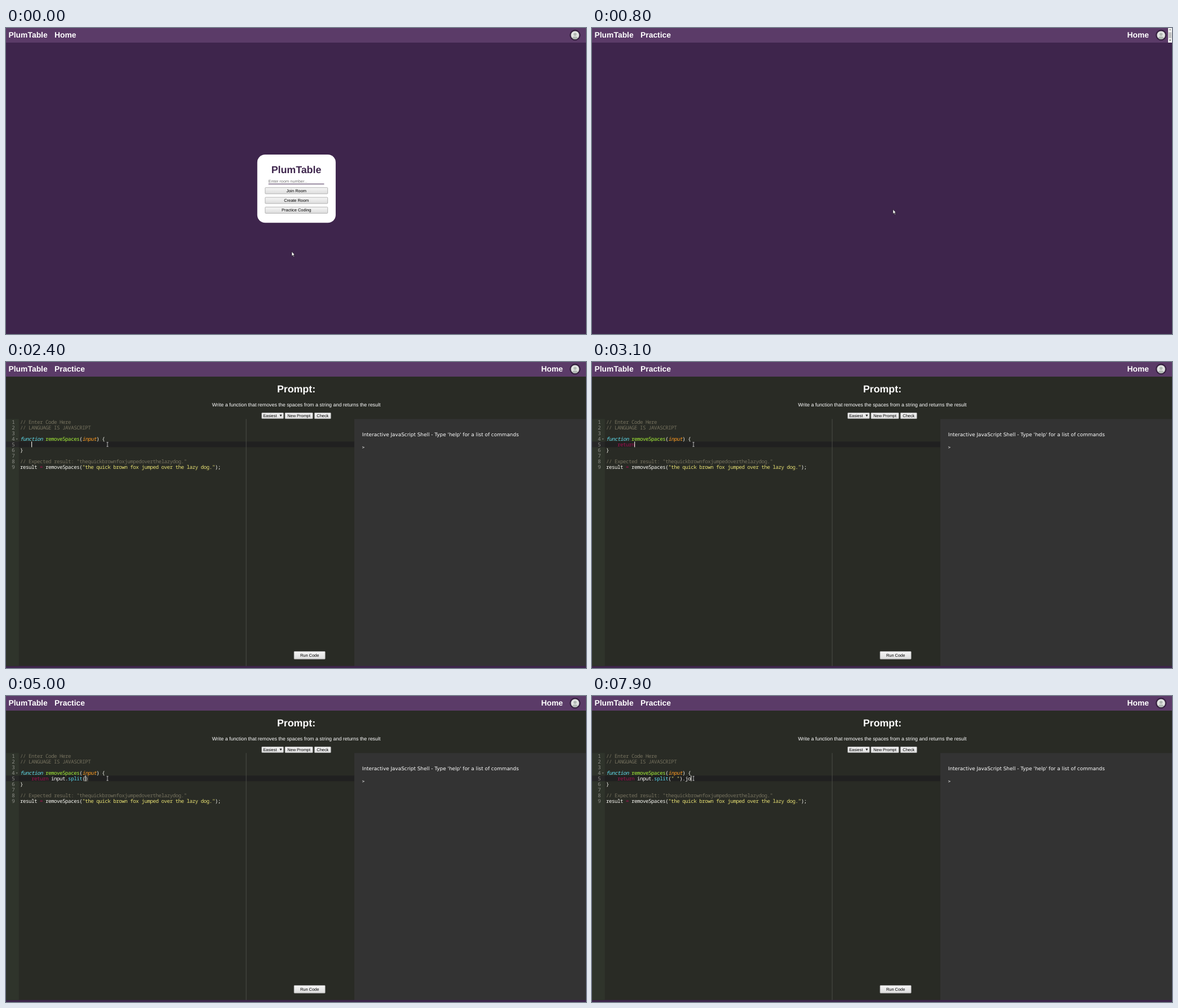
Animation, 1029 px wide and 544 px high, one loop 8 s. Source, as an HTML page with a canvas:

```html
<!DOCTYPE html>
<html lang="en">
<head>
<meta charset="utf-8">
<title>Coding practice</title>
<style>
  html, body { margin: 0; width: 100%; height: 100%; overflow: hidden; background: #3e254c; }
  canvas { display: block; }
</style>
</head>
<body>
<canvas id="stage" width="1029" height="544"></canvas>
<script>
const ctx = document.getElementById('stage').getContext('2d');
const LOOP = 8000;
const SANS = '"Liberation Sans", Arial, sans-serif';
const SHELL = '"DejaVu Sans", sans-serif';
const MONO = '"Noto Sans Mono", monospace';
const BRAND = 'PlumTable';

const COLOR = {
  page: '#3e254c', nav: '#5b3b68', editor: '#292b25', gutter: '#2f342b',
  plain: '#f8f8f2', comment: '#75715e', keyword: '#a5104f', type: '#5fdcec',
  name: '#a3ee36', param: '#fd971f', string: '#e6df72'
};

// Editor grid
const COL = 5.01, ROW = 10.01, LEFT = 25.2, TOP = 101.4;
const colX = c => LEFT + c * COL;
const rowY = r => TOP + (r - 1) * ROW;

// [time, x, y]
const arrowPath = [
  [0, 507, 397.5], [100, 512, 388], [200, 521, 367], [300, 530, 346],
  [400, 533.5, 334.8], [600, 534, 322.5]
];
const beamPath = [
  [1000, 535, 323.5], [1100, 510, 290], [1200, 460, 238], [1300, 424, 209],
  [1500, 385, 198], [1600, 310, 179], [1700, 245, 164], [1800, 200, 152], [1900, 180, 146.5]
];

// [time, text before caret, text after caret, columns of matched brackets]
const typing = [
  [2000, '', ''], [2400, '    ', ''],
  [2600, '    r', ''], [2700, '    re', ''], [2900, '    ret', ''], [3100, '    return', ''],
  [3300, '    return ', ''], [3400, '    return i', ''], [3500, '    return in', ''],
  [3600, '    return inp', ''], [3800, '    return inpu', ''], [3900, '    return input', ''],
  [4100, '    return input.', ''], [4200, '    return input.s', ''], [4400, '    return input.spl', ''],
  [4600, '    return input.spli', ''], [4700, '    return input.split', ''],
  [4900, '    return input.split(', ')'], [5000, '    return input.split(', ')', [23]],
  [5500, '    return input.split("', '")'], [5700, '    return input.split(" ', '")'],
  [5900, '    return input.split(" "', ')'], [6300, '    return input.split(" ")', ''],
  [6400, '    return input.split(" ")', '', [22, 26]], [6700, '    return input.split(" ").', ''],
  [7300, '    return input.split(" ")', '', [22, 26]], [7500, '    return input.split(" ").', ''],
  [7700, '    return input.split(" ").j', ''], [7900, '    return input.split(" ").jo', '']
];

const latest = (steps, t) => steps.filter(s => s[0] <= t).pop();

function rect(x, y, w, h, fill) {
  ctx.fillStyle = fill;
  ctx.fillRect(x, y, w, h);
}

function disc(x, y, r, fill) {
  ctx.fillStyle = fill;
  ctx.beginPath();
  ctx.arc(x, y, r, 0, Math.PI * 2);
  ctx.fill();
}

function poly(points, fill) {
  ctx.beginPath();
  points.forEach(([x, y]) => ctx.lineTo(x, y));
  ctx.closePath();
  ctx.fillStyle = fill;
  ctx.fill();
}

function text(str, x, y, font, fill, align = 'left') {
  ctx.font = font;
  ctx.fillStyle = fill;
  ctx.textAlign = align;
  ctx.fillText(str, x, y);
}

function button(x, y, w, h, label, pressed, labelX = x + w / 2) {
  const shade = ctx.createLinearGradient(0, y, 0, y + h);
  shade.addColorStop(0, pressed ? '#d2d2d2' : '#f6f6f6');
  shade.addColorStop(1, pressed ? '#e8e8e8' : '#dcdcdc');
  ctx.beginPath();
  ctx.roundRect(x + 0.3, y + 0.3, w - 0.6, h - 0.6, 1);
  ctx.fillStyle = shade;
  ctx.fill();
  ctx.strokeStyle = '#9a9a9a';
  ctx.lineWidth = 0.7;
  ctx.stroke();
  text(label, labelX, y + h / 2 + 2.6, '7.42px ' + SANS, '#000', 'center');
}

function drawNav(title, showHome) {
  const font = 'bold 13.9px ' + SANS;
  rect(0, 0, 1029, 26, COLOR.nav);
  text(BRAND, 4.5, 17.3, font, '#fff');
  text(title, 86, 17.3, font, '#fff');
  if (showHome) text('Home', 949.5, 17.3, font, '#fff');
  disc(1009.6, 12.7, 9.6, '#35203f');
  disc(1009.6, 12.7, 7.3, '#e2e4e2');
  disc(1009.6, 11.2, 2.7, '#b2bab4');
  ctx.beginPath();
  ctx.ellipse(1009.6, 17.6, 4.6, 2.6, 0, 0, Math.PI * 2);
  ctx.fill();
}

function drawCard(pressed) {
  ctx.fillStyle = '#fff';
  ctx.beginPath();
  ctx.roundRect(445.8, 225, 139.1, 121.3, 14);
  ctx.fill();
  text(BRAND, 515, 258, 'bold 17.8px ' + SANS, COLOR.page, 'center');
  text('Enter room number...', 465.6, 275.3, '7.42px ' + SANS, '#757575');
  rect(465.6, 276.8, 98.8, 1, COLOR.page);
  button(459.5, 283.4, 111.5, 11.7, 'Join Room');
  button(459.5, 300.7, 111.5, 11.7, 'Create Room');
  button(459.5, 318, 111.5, 11.7, 'Practice Coding', pressed);
}

function drawScrollbar() {
  rect(1022, 0, 7, 26, '#f1f1f1');
  rect(1022.8, 7.5, 5.4, 10.5, '#c1c1c1');
  poly([[1023.8, 4], [1027.4, 4], [1025.6, 1.8]], '#8a8a8a');
  poly([[1023.8, 20.8], [1027.4, 20.8], [1025.6, 23]], '#505050');
}

function drawPrompt() {
  rect(0, 26, 1029, 76, COLOR.editor);
  text('Prompt:', 515, 54.2, 'bold 17.8px ' + SANS, '#fff', 'center');
  text('Write a function that removes the spaces from a string and returns the result',
    515, 78.6, '8.9px ' + SANS, '#fff', 'center');
  button(453.4, 90, 39.2, 11, 'Easiest', false, 468.3);
  poly([[485.3, 93.6], [489.7, 93.6], [487.5, 97.2]], '#222');
  button(494.7, 90, 49.8, 11.2, 'New Prompt');
  button(547, 90, 29.6, 11.2, 'Check');
}

// Code is laid out on a fixed column grid
function code(row, col, str, kind = 'plain', italic = '') {
  ctx.font = `${italic} 9.2px ${MONO}`;
  ctx.letterSpacing = '0px';
  ctx.letterSpacing = COL - ctx.measureText('0').width + 'px';
  ctx.fillStyle = COLOR[kind];
  ctx.textAlign = 'left';
  ctx.fillText(str, colX(col) - 0.25, rowY(row) + 8.1);
  ctx.letterSpacing = '0px';
}

function codeLine(row, tokens) {
  let col = 0;
  for (const [str, kind, italic] of tokens) {
    code(row, col, str, kind, italic);
    col += str.length;
  }
}

function typedTokens(line) {
  return line.split(/(\breturn\b|split(?=\()|" ?")/).map(part => {
    if (part === 'return') return [part, 'keyword'];
    if (part === 'split' && line.includes('split(')) return [part, 'type'];
    return [part, part[0] === '"' ? 'string' : 'plain'];
  });
}

function drawEditor(t) {
  const [, before, after, brackets = []] = latest(typing, t) || [0, '', ''];
  const active = t < 2000 ? 3 : 5;
  const bottom = 540.5;

  rect(0, TOP, 618, bottom - TOP, COLOR.editor);
  rect(0, TOP, 22.8, bottom - TOP, COLOR.gutter);
  rect(0, rowY(active), 22.8, ROW, '#272727');
  rect(22.8, rowY(active), 595.2, ROW, '#202020');
  rect(425.7, TOP, 0.8, bottom - TOP, '#555651');

  for (let row = 1; row <= 9; row++) {
    text(row, 15.7, rowY(row) + 8.1, '9.2px ' + MONO, '#8f908a', 'right');
  }
  poly([[17.8, 136.2], [20.8, 136.2], [19.3, 138]], '#8f908a');

  codeLine(1, [['// Enter Code Here', 'comment']]);
  codeLine(2, [['// LANGUAGE IS JAVASCRIPT', 'comment']]);
  codeLine(4, [['function', 'type', 'italic'], [' '], ['removeSpaces', 'name'], ['('],
    ['input', 'param', 'italic'], [') {']]);
  codeLine(5, typedTokens(before + after));
  codeLine(6, [['}']]);
  codeLine(8, [['// Expected result: "thequickbrownfoxjumpedoverthelazydog."', 'comment']]);
  codeLine(9, [['result '], ['=', 'keyword'], [' removeSpaces('],
    ['"the quick brown fox jumped over the lazy dog."', 'string'], [');']]);

  ctx.strokeStyle = '#5a594e';
  ctx.lineWidth = 0.7;
  for (const col of brackets) ctx.strokeRect(colX(col), rowY(5) + 0.3, COL, ROW - 0.6);

  const caretFill = t < 2000 ? '#8f8f88' : '#f8f8f0';
  rect(colX(before.length) - 0.2, rowY(active), 1.1, ROW, caretFill);
  button(510.7, 514.3, 55.8, 14.2, 'Run Code');
}

function drawShell() {
  rect(618, TOP, 411, 540.5 - TOP, '#333');
  text("Interactive JavaScript Shell - Type 'help' for a list of commands",
    631.8, 132.4, '8.9px ' + SHELL, '#fff');
  text('>', 631.8, 153.8, '7.2px "DejaVu Sans Mono", monospace', '#fff');
}

function drawArrow([, x, y]) {
  const shape = [[0, 0], [0, 8], [1.9, 6.3], [3.2, 9.3], [4.4, 8.7], [3.1, 5.8], [5.3, 5.8]];
  poly(shape.map(([dx, dy]) => [x + dx, y + dy]), '#fff');
  ctx.strokeStyle = '#111';
  ctx.lineWidth = 0.6;
  ctx.stroke();
}

function drawBeam([, x, y]) {
  const bars = [[-0.4, -4, 0.8, 8], [-1.6, -4, 3.2, 0.8], [-1.6, 3.2, 3.2, 0.8]];
  for (const [dx, dy, w, h] of bars) rect(x + dx - 0.3, y + dy - 0.3, w + 0.6, h + 0.6, '#1a1a1a');
  for (const [dx, dy, w, h] of bars) rect(x + dx, y + dy, w, h, '#dcdcdc');
}

function draw(t) {
  ctx.textRendering = 'geometricPrecision';
  rect(0, 0, 1029, 544, COLOR.page);
  drawNav(t < 800 ? 'Home' : 'Practice', t >= 800);
  if (t < 800) drawCard(t >= 600);
  else if (t < 1000) drawScrollbar();
  else {
    drawPrompt();
    drawEditor(t);
    drawShell();
  }
  if (t < 1000) drawArrow(latest(arrowPath, t));
  else drawBeam(latest(beamPath, t));
}

function tick() {
  draw(performance.now() % LOOP);
  requestAnimationFrame(tick);
}
tick();
</script>
</body>
</html>
```
